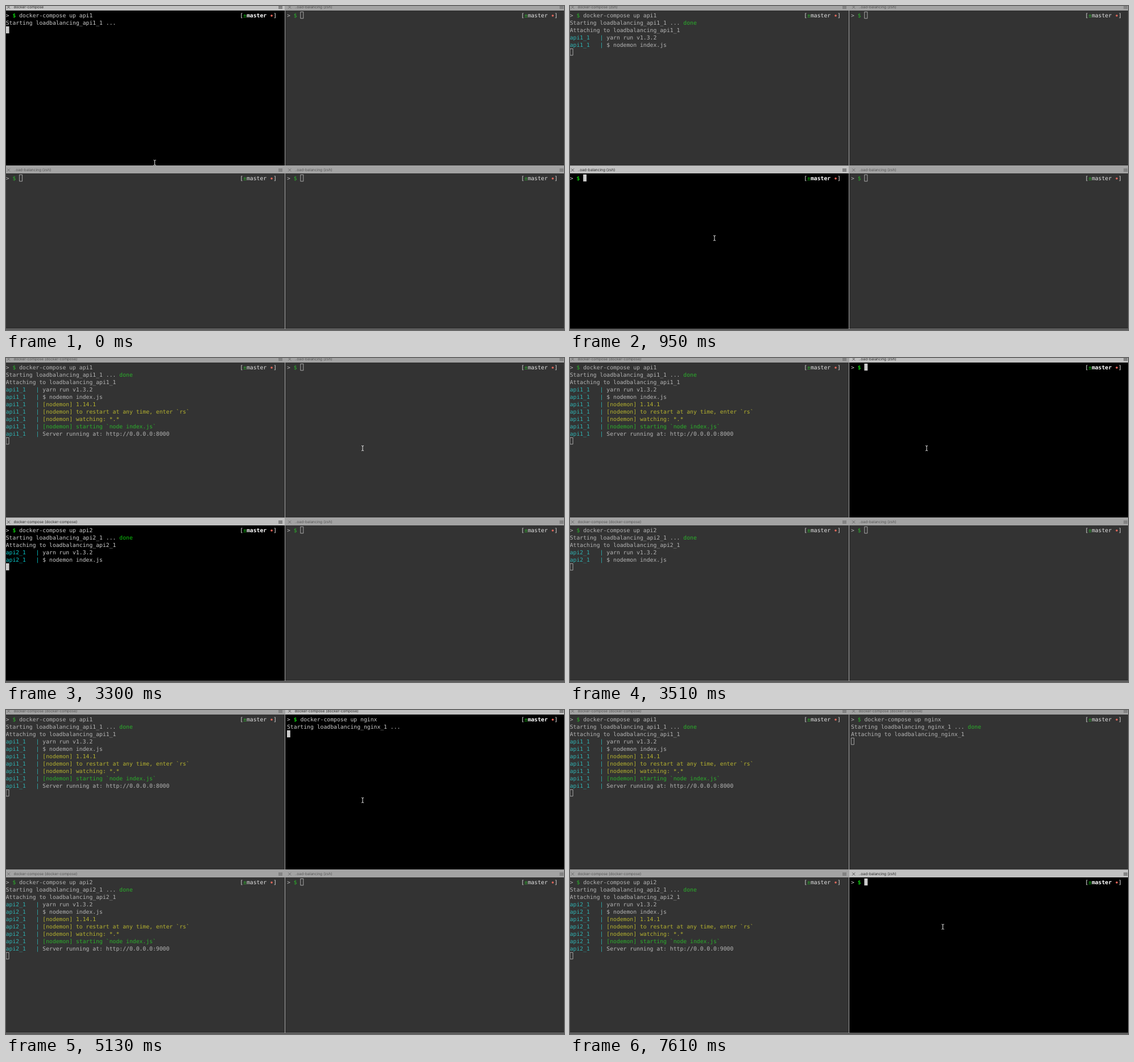
Animation, 981 px wide and 571 px high, one loop 8 s. Source, as an HTML page:

```html
<!DOCTYPE html>
<html lang="en">
<head>
<meta charset="utf-8">
<title>Terminal panes</title>
<style>
  html, body { margin: 0; width: 100%; height: 100%; overflow: hidden; background: #222; }
  svg { display: block; width: 981px; height: 571px; }
  text { white-space: pre; text-rendering: geometricPrecision; }
  .mono { font: 9.75px "DejaVu Sans Mono", monospace; }
  .bar { font: 6.55px Inter, sans-serif; }
  .bold { font-weight: 700; }
</style>
</head>
<body>
<svg id="stage" viewBox="0 0 981 571"></svg>
<script>
const LOOP = 8000, CELL = 5.87, ROW = 13;
const stage = document.getElementById('stage');

const ACTIVE = { bg: '#000', bar: '#c1c1c1', label: '#2a2a2a', text: '#cbcbcb', green: '#0cc40c',
  yellow: '#c7c41c', cyan: '#08c5c7', white: '#fff', red: '#f8685c' };
const DIMMED = { bg: '#333', bar: '#a3a3a3', label: '#555', text: '#b4b4b4', green: '#2bb02b',
  yellow: '#b5b22f', cyan: '#2fb0b0', white: '#e2e2e2', red: '#e0695c' };

const SHELL = '..oad-balancing (zsh)', RUN = 'docker-compose';
const RUN_ZSH = RUN + ' (zsh)', RUN_FULL = RUN + ' (docker-compose)';

// steps: [time, output lines, title]; -2 = empty prompt, -1 = command typed
const panes = [
  { x: 0, y: 0, name: 'api1', port: 8000, steps: [[0, 1, RUN], [180, 2, RUN], [530, 4, RUN],
    [950, 4, RUN_ZSH], [1370, 8, RUN_FULL], [2230, 9, RUN_FULL]] },
  { x: 0, y: 287, name: 'api2', port: 9000, steps: [[0, -2, SHELL], [1370, -1, SHELL], [2030, 0, RUN],
    [2440, 1, RUN_FULL], [2890, 2, RUN_FULL], [3300, 4, RUN_FULL], [4290, 8, RUN_FULL], [4920, 9, RUN_FULL]] },
  { x: 494.2, y: 0, name: 'nginx', steps: [[0, -2, SHELL], [3930, -1, SHELL], [4500, 0, RUN],
    [5130, 1, RUN_FULL], [5730, 2, RUN_FULL]] },
  { x: 494.2, y: 287, name: '', steps: [[0, -2, SHELL]] }
];

const focus = [[0, 0], [950, 1], [3510, 2], [7610, 3]];

const mouse = [[0, 261.5, 276], [180, 261.5, 367], [530, 254, 409], [2230, 462.5, 309],
  [2440, 478.5, 297], [2680, 580.5, 219], [2890, 552.5, 244], [3090, 627, 159], [5940, 627, 165],
  [6150, 653.5, 235], [6350, 665.5, 338], [6560, 655.5, 382]];

const at = (steps, t) => steps.filter(s => s[0] <= t).pop();
const rect = (x, y, w, h, fill) => `<rect x="${x}" y="${y}" width="${w}" height="${h}" fill="${fill}"/>`;
const path = (d, color, w) => `<path d="${d}" fill="none" stroke="${color}" stroke-width="${w}"/>`;

function output(name, port) {
  const log = (color, msg) => [[0, 'cyan', name + '_1'], [9, 'cyan', '|'], [11, color, msg]];
  return [
    [[0, 'text', `Starting loadbalancing_${name}_1 ...`]],
    [[0, 'text', `Attaching to loadbalancing_${name}_1`]],
    log('text', 'yarn run v1.3.2'),
    log('text', '$ nodemon index.js'),
    log('yellow', '[nodemon] 1.14.1'),
    log('yellow', '[nodemon] to restart at any time, enter `rs`'),
    log('yellow', '[nodemon] watching: *.*'),
    log('green', '[nodemon] starting `node index.js`'),
    log('text', `Server running at: http://0.0.0.0:${port}`)
  ];
}

function drawPane(pane, t, active) {
  const { x, y, name, port } = pane;
  const c = active ? ACTIVE : DIMMED;
  const [, count, title] = at(pane.steps, t);
  const left = x ? 491 : 0, x0 = x - 0.3;
  const put = (row, col, color, str, cls = '') =>
    `<text class="mono ${cls}" x="${x0 + col * CELL}" y="${y + 19.6 + row * ROW}" fill="${c[color]}">${str}</text>`;

  // title bar
  let s = rect(left, y + 8, 490, y ? 274 : 273, c.bg) + rect(left, y - 5, 490, 13, c.bar);
  s += `<text class="bar" x="${x + 13.4}" y="${y + 4.3}" fill="${c.label}">${title}</text>`;
  s += path(`M${x + 2} ${y - .5}l5 5m0 -5l-5 5`, c.label, 0.7);
  s += path([0, 2, 4].map(d => `M${x + 479} ${y + d + .2}h7`).join(''), c.label, 0.8);

  // prompt and branch
  const bold = active ? 'bold' : '';
  s += put(0, 0, 'text', '&gt;') + put(0, 2, 'green', '$', bold);
  s += put(0, 70.1, 'white', '[') + put(0, 71.1, 'green', '±');
  s += put(0, 72.1, 'white', 'master', bold) + put(0, 80.1, 'white', ']');
  s += `<circle cx="${x + 467}" cy="${y + 17}" r="1.8" fill="${c.red}"/>`;

  // command and its output
  const cmd = count > -2 ? `docker-compose up ${name}` : '';
  s += put(0, 4, 'text', cmd);
  output(name, port).slice(0, Math.max(0, count)).forEach((line, i) => {
    for (const [col, color, str] of line) s += put(i + 1, col, color, str);
  });
  if (count > 1) s += put(1, 22 + name.length + 8, 'green', 'done');

  const row = Math.max(0, count + 1);
  const cx = x0 + (row ? 0 : (4 + cmd.length) * CELL), cy = y + 9.8 + row * ROW;
  s += active ? rect(cx, cy, 5.9, 12.4, c.text)
    : path(`M${cx + .4} ${cy + .5}h5v11.6h-5z`, c.text, 0.9);
  return s;
}

function drawMouse([, x, y]) {
  const d = `M${x - 2} ${y - 4.5}q2 0 2 1.5v6q0 1.5 -2 1.5M${x + 2} ${y - 4.5}q-2 0 -2 1.5m0 6q0 1.5 2 1.5`;
  return path(d, '#e6e6e6', 1);
}

function render(t) {
  const current = at(focus, t)[1];
  return rect(0, 0, 981, 570, '#a3a3a3') + rect(0, 570, 981, 1, '#222') +
    panes.map((p, i) => drawPane(p, t, i === current)).join('') + drawMouse(at(mouse, t));
}

const times = [...new Set([focus, mouse, ...panes.map(p => p.steps)].flat().map(s => s[0]))].sort((a, b) => a - b);
let shown = -1;
const start = performance.now();

function tick(now) {
  const t = Math.max(0, now - start) % LOOP;
  const step = times.filter(v => v <= t).pop();
  if (step !== shown) {
    shown = step;
    stage.innerHTML = render(step);
  }
  requestAnimationFrame(tick);
}
tick(start);
</script>
</body>
</html>
```
